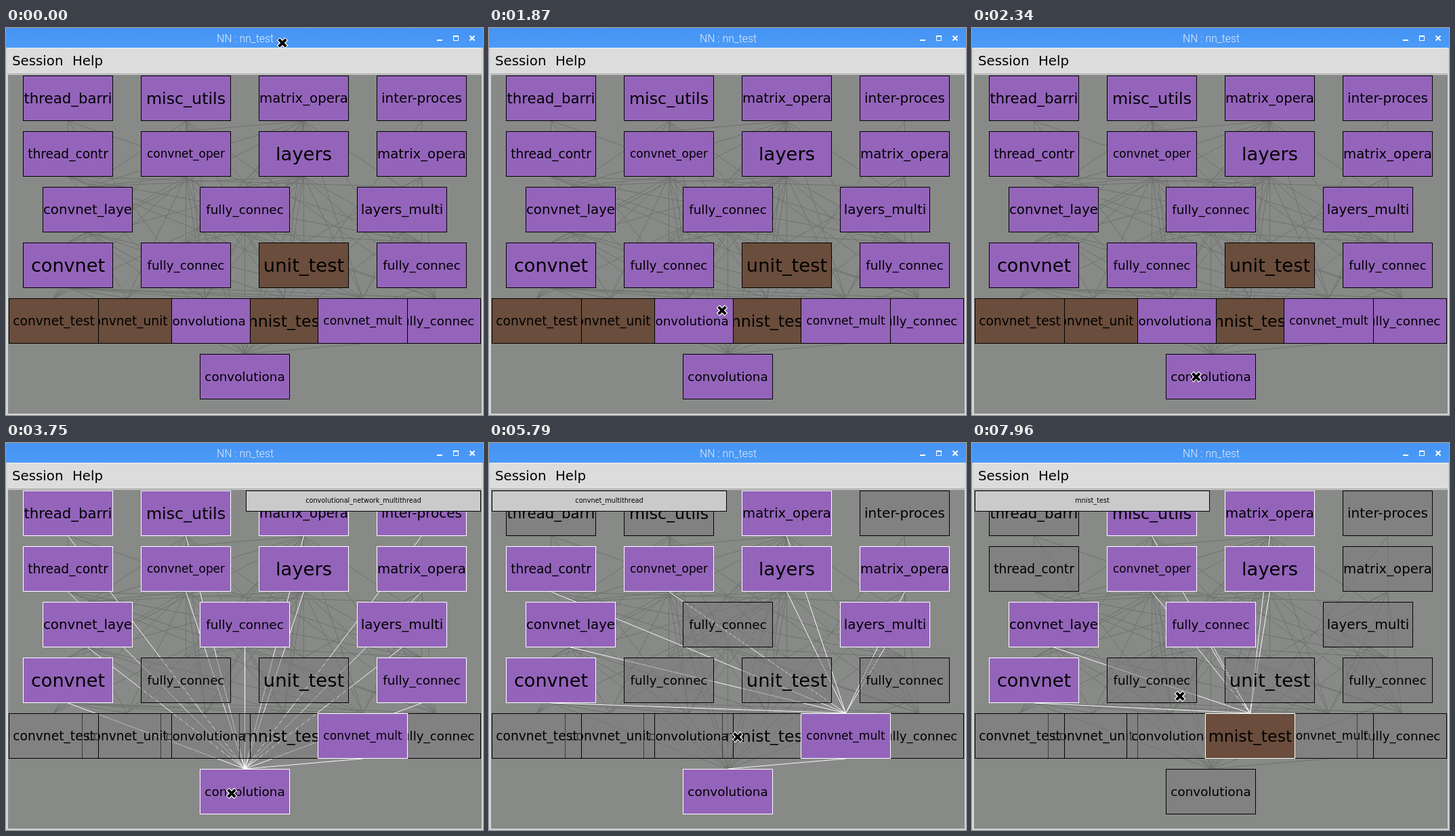
These frames come from a looping animation (704 by 570 pixels, 8 s). An HTML page with a canvas:

```html
<!DOCTYPE html>
<html>
<head>
<meta charset="utf-8">
<style>
html, body { margin: 0; width: 100%; height: 100%; overflow: hidden; }
canvas { display: block; }
</style>
</head>
<body>
<canvas id="stage" width="704" height="570"></canvas>
<script>
const ctx = document.getElementById('stage').getContext('2d');
const LOOP = 8000, STEP = 70, W = 132, H = 66;
const PURPLE = '#9464bb', BROWN = '#6a4d3c', BACK = '#888a88';
const SANS = '"DejaVu Sans", sans-serif';

// Each row: left edges, then "label size dependencies" (dependencies as letters, a = first node)
const rows = [
  [[25, 199, 373, 547], ['thread_barri 21.3', 'misc_utils 23.8', 'matrix_opera 19.7', 'inter-proces 20']],
  [[25, 199, 373, 547], ['thread_contr 18.6 a', 'convnet_oper 16.9 bc', 'layers 27.4 c', 'matrix_opera 19.7 d']],
  [[54, 286, 518], ['convnet_laye 19.8 bcfg', 'fully_connec 18.4 cg', 'layers_multi 20 ceh']],
  [[25, 199, 373, 547], ['convnet 27.1 cfgi', 'fully_connec 18.3 bcgj', 'unit_test 27.4 bcfgh', 'fully_connec 18.4 adeghjk']],
  [[4, 112, 228, 344, 460, 568], ['convnet_test 18.7 bfgil', 'convnet_unit 18.6 cfgil', 'convolutiona 18.4 bcfgijl',
    'mnist_test 23.7 bcfgijl', 'convnet_mult 17.1 cefghikl', 'fully_connec 18.3 bceghjkm']],
  [[286], ['convolutiona 18.4 abcdefghijklot']]
];
const nodes = rows.flatMap(([xs, defs], r) => xs.map((x, i) => {
  const [label, size, deps = ''] = defs[i].split(' ');
  return { x, y: 70 + 82 * r, label, size: +size,
    deps: [...deps].map(c => c.charCodeAt(0) - 97),
    color: /_(test|unit)/.test(label) ? BROWN : PURPLE };
}));

const tips = { 6: 'layers', 9: 'fully_connected', 17: 'convolutional_network', 18: 'mnist_test',
  19: 'convnet_multithread', 21: 'convolutional_network_multithread' };

// [start time, hovered node or -1, height already repainted]
const hovers = [[0, -1], [1650, 6], [1820, -1], [2100, 9, 167], [2190, 9], [2280, -1], [2350, 21],
  [4030, -1], [4160, 19], [5860, -1], [5900, 18], [5960, 17], [7030, -1], [7110, 18]];

// [time, x, y] of the pointer
const path = [[0, 408, 22], [70, 404, 28], [300, 404, 29], [770, 404, 29], [980, 409, 37], [1100, 408, 40],
  [1330, 406, 40], [1480, 402, 75], [1700, 365, 290], [1900, 335, 470], [2100, 327, 510], [2430, 333, 516],
  [3750, 333, 516], [4250, 542, 438], [4450, 544, 438], [4540, 540, 438], [5090, 539, 439], [5380, 539, 439],
  [5790, 367, 433], [6000, 295, 444], [6640, 295, 444], [6960, 402, 435], [7110, 414, 435], [7810, 414, 435],
  [7960, 307, 373], [8000, 307, 373]];

const pattern = (() => {
  const c = document.createElement('canvas');
  c.width = c.height = 2;
  const g = c.getContext('2d');
  g.fillStyle = '#787878';
  g.fillRect(0, 0, 1, 1);
  g.fillRect(1, 1, 1, 1);
  return ctx.createPattern(c, 'repeat');
})();

function rect(x, y, w, h, color) {
  ctx.fillStyle = color;
  ctx.fillRect(x, y, w, h);
}

function frame(x, y, w, h, color, width = 1) {
  ctx.strokeStyle = color;
  ctx.lineWidth = width;
  ctx.strokeRect(x + width / 2, y + width / 2, w, h);
}

function line(x1, y1, x2, y2, color, width = 1) {
  ctx.strokeStyle = color;
  ctx.lineWidth = width;
  ctx.beginPath();
  ctx.moveTo(x1, y1);
  ctx.lineTo(x2, y2);
  ctx.stroke();
}

function text(str, x, y, font, color = '#000', align = 'center') {
  ctx.font = font;
  ctx.fillStyle = color;
  ctx.textAlign = align;
  ctx.fillText(str, x, y);
}

function edges(color, wanted) {
  nodes.forEach((n, i) => n.deps.forEach(d => {
    const from = nodes[d];
    if (wanted(i, d)) line(from.x + 66.5, from.y + H + 1, n.x + 66.5, n.y, color);
  }));
}

function drawNode(n, hovering, lit) {
  rect(n.x, n.y, W + 1, H + 1, hovering && !lit ? pattern : n.color);
  ctx.save();
  ctx.beginPath();
  ctx.rect(n.x, n.y, W + 1, H + 1);
  ctx.clip();
  text(n.label, n.x + 66.5, n.y + 33.5 + n.size * 0.346, n.size + 'px ' + SANS);
  ctx.restore();
  frame(n.x, n.y, W, H, lit ? '#fff' : '#000');
}

function drawGraph(hover, order) {
  const hovering = hover >= 0;
  const linked = (a, b) => a === hover || b === hover;
  rect(3, 69, 699, 499, BACK);
  edges('#707270', () => true);
  if (hovering) edges('#fff', linked);
  for (const i of order) {
    const lit = hovering && (i === hover || nodes[hover].deps.includes(i) || nodes[i].deps.includes(hover));
    drawNode(nodes[i], hovering, lit);
  }
}

function drawTip(hover) {
  const x = nodes[hover].x + 66 > 352 ? 4 : 354;
  rect(x, 70, 347, 31, '#cacaca');
  frame(x, 70, 346, 30, '#000');
  text(tips[hover], x + 173.5, 88, '9.7px ' + SANS);
}

function drawWindow() {
  rect(0, 0, 704, 570, '#d6d6d6');
  const blue = ctx.createLinearGradient(0, 0, 0, 29);
  blue.addColorStop(0, '#4593f2');
  blue.addColorStop(1, '#4c9bf8');
  rect(0, 0, 704, 29, blue);
  text('NN : nn_test', 353, 21, '300 15.8px Roboto, sans-serif', '#e4eefb');
  rect(636, 17, 8, 2, '#fff');
  frame(660, 12, 7, 6, '#fff');
  rect(660, 11, 8, 2, '#fff');
  line(684.5, 11.5, 691.5, 18.5, '#fff', 2);
  line(691.5, 11.5, 684.5, 18.5, '#fff', 2);
  rect(2, 29, 700, 39, '#dcdcdc');
  rect(2, 29, 700, 1, '#f0f0f0');
  rect(2, 67, 700, 1, '#a4a4a4');
  text('Session', 9, 55, '19.8px ' + SANS, '#000', 'left');
  text('Help', 98, 55, '19.8px ' + SANS, '#000', 'left');
}

function drawPointer(t) {
  const i = path.findIndex(p => p[0] > t);
  const [t0, x0, y0] = path[i - 1], [t1, x1, y1] = path[i];
  const k = Math.floor((t - t0) / STEP) * STEP / (t1 - t0);
  const x = x0 + (x1 - x0) * k, y = y0 + (y1 - y0) * k;
  for (const [color, width, r] of [['#fff', 6.5, 6], ['#000', 4, 5.3]]) {
    line(x - r, y - r, x + r, y + r, color, width);
    line(x + r, y - r, x - r, y + r, color, width);
  }
}

// Nodes pointed at so far are raised to the top
function stacking(past) {
  let order = nodes.map((_, i) => i).filter(i => i < 15 || i > 20).concat(20, 18, 17, 16, 15, 19);
  for (const [, h] of past)
    if (h > 14) order = order.filter(i => i !== h).concat(h);
  return order;
}

function draw(t) {
  const past = hovers.filter(h => h[0] <= t);
  const [, hover, cut] = past[past.length - 1];
  const order = stacking(past);
  drawWindow();
  if (cut) {
    drawGraph(-1, order);
    ctx.save();
    ctx.beginPath();
    ctx.rect(0, 0, 704, cut);
    ctx.clip();
    drawGraph(hover, order);
    ctx.restore();
  } else {
    drawGraph(hover, order);
    if (hover >= 0) drawTip(hover);
  }
  drawPointer(t);
}

const start = performance.now();
function tick() {
  draw((performance.now() - start) % LOOP);
  requestAnimationFrame(tick);
}
tick();
</script>
</body>
</html>
```
